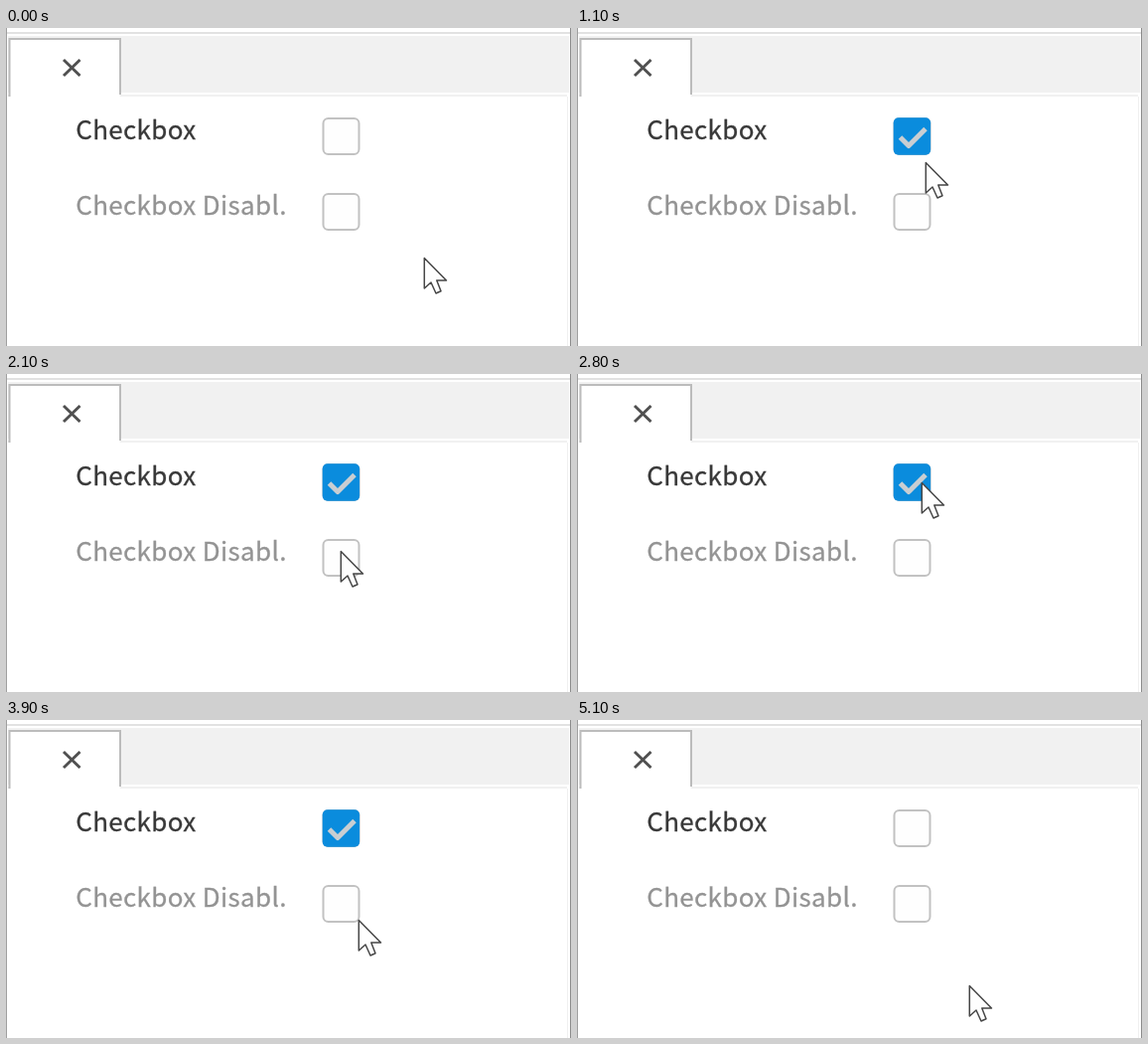
These frames come from a looping animation (569x320 px, 5800 ms). An HTML page:

```html
<!DOCTYPE html>
<html lang="en">
<head>
<meta charset="utf-8">
<title>Checkbox</title>
<style>
  html, body { margin: 0; height: 100%; overflow: hidden; background: #fff; }
  svg { display: block; width: 569px; height: 320px; }
  text {
    font: 26px "Noto Sans CJK SC", "Noto Sans CJK JP", "Noto Sans CJK", sans-serif;
    letter-spacing: .35px; fill: currentColor; stroke: currentColor; stroke-width: .3;
  }
  .box { fill: #fefefe; stroke: #c2c2c2; stroke-width: 2; }
</style>
</head>
<body>
<svg viewBox="0 0 569 320">
  <!-- Window and tab bar -->
  <rect y="4" width="569" height="2" fill="#e2e2e2"/>
  <rect x="2" y="8" width="565" height="57" fill="#f1f1f1"/>
  <rect x="2" y="67" width="563" height="2" fill="#f1f1f1"/>
  <path d="M3 11H115V69H3Z" fill="#fff"/>
  <path d="M3.5 69V11H115V67" fill="none" stroke="#bcbcbc" stroke-width="2"/>
  <path d="M.5 0V320" stroke="#a0a0a0"/>
  <path d="M565.5 69V320" stroke="#f0f0f0"/>
  <path d="M568.5 0V320" stroke="#8c8c8c"/>
  <path d="M58 32L74.5 48M74.5 32L58 48" stroke="#505050" stroke-width="2.9"/>

  <text x="70.2" y="112" color="#383838">Checkbox</text>
  <text x="70.2" y="188" color="#939393">Checkbox Disabl.</text>
  <rect class="box" x="319.5" y="91" width="36" height="36" rx="5"/>
  <rect class="box" x="319.5" y="167" width="36" height="36" rx="5"/>

  <g id="checked">
    <rect x="318.7" y="90.3" width="37.4" height="37.4" rx="5" fill="#0a8cdd"/>
    <path d="M325.5 110L334 118.5L351 101.5" fill="none" stroke="#c9ced2"
          stroke-width="5" stroke-linejoin="round"/>
  </g>

  <path id="pointer" d="M.3 .5V31L7 25L12 36L17 33.8L12.8 23H22.5Z"
        fill="#fefefe" stroke="#464646" stroke-width="1.5" stroke-linejoin="round"/>
</svg>
<script>
const LOOP = 5800, STEP = 100, MOVE = 400;

// Arrival time and place of the pointer tip; each move takes at most MOVE ms
const stops = [
  [0, 421, 231], [600, 342, 111], [1100, 351, 135], [1200, 340, 115],
  [2100, 337, 178], [2800, 347, 109], [3400, 351, 120], [3700, 355, 201],
  [4400, 339, 147], [4600, 336, 113], [5100, 395, 267]
];
const clicks = [700, 1300, 1800, 2900, 3200, 4600];

const checked = document.getElementById("checked");
const pointer = document.getElementById("pointer");
const ease = k => k * k * (3 - 2 * k);

function position(t) {
  const next = stops.findIndex(([arrival]) => arrival > t);
  if (next < 0) return stops.at(-1).slice(1);
  const [t0, x0, y0] = stops[next - 1], [t1, x1, y1] = stops[next];
  const start = Math.max(t0, t1 - MOVE);
  const k = ease(Math.max(0, (t - start) / (t1 - start)));
  return [x0 + (x1 - x0) * k, y0 + (y1 - y0) * k];
}

function draw() {
  const t = Math.floor(performance.now() % LOOP / STEP) * STEP;
  const isOn = clicks.filter(c => c <= t).length % 2 === 1;
  checked.setAttribute("visibility", isOn ? "visible" : "hidden");
  pointer.setAttribute("transform", `translate(${position(t)})`);
  requestAnimationFrame(draw);
}
draw();
</script>
</body>
</html>
```
